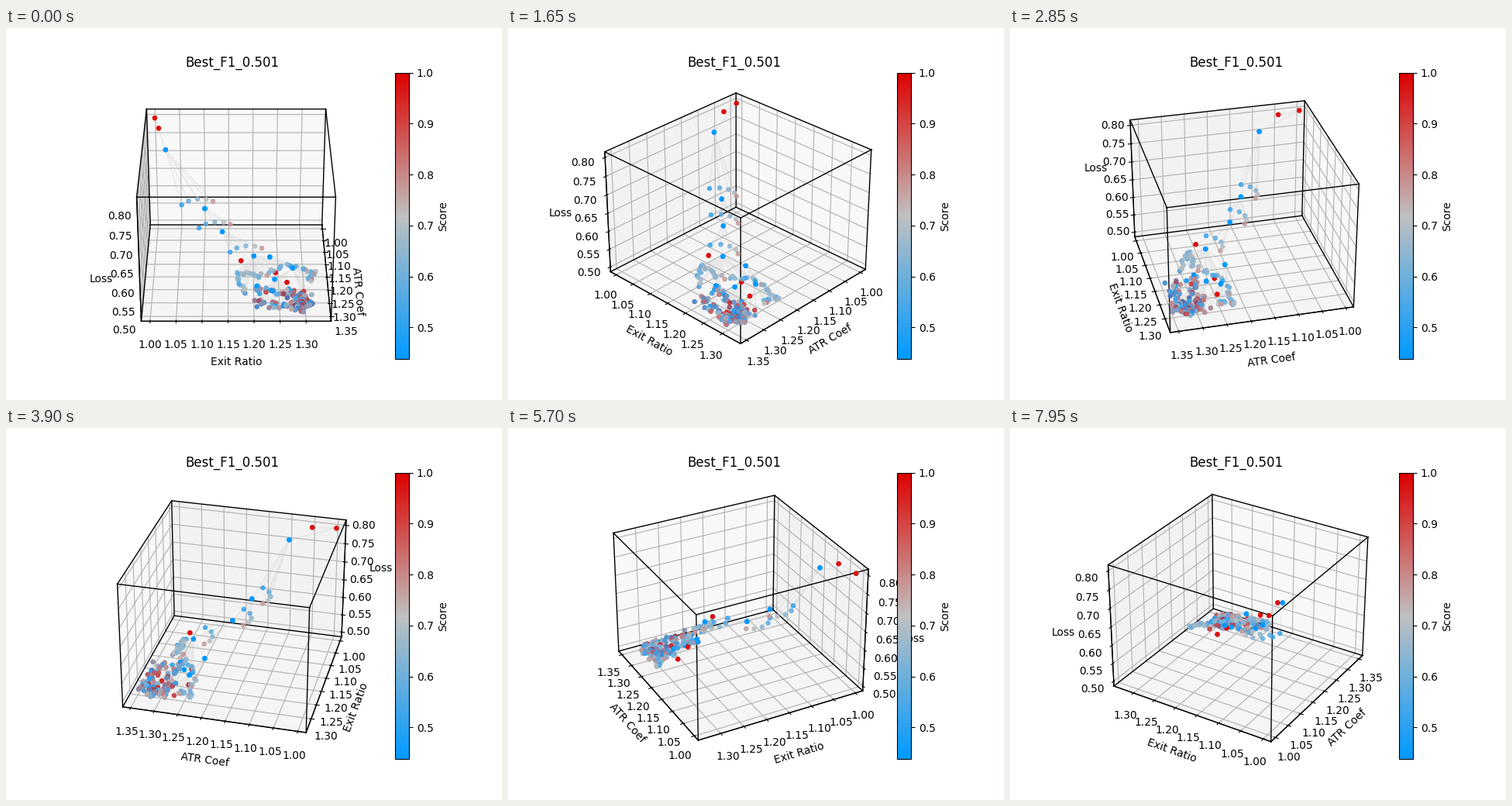
A matplotlib script that plays this animation: 640 px wide and 480 px high, repeating every 8 s.

```python
from itertools import combinations, product

import matplotlib.pyplot as plt
import numpy as np
from matplotlib.animation import FuncAnimation
from matplotlib.cm import ScalarMappable
from matplotlib.colors import LinearSegmentedColormap, Normalize

FRAMES, INTERVAL = 80, 100
VIEW_MS, DEGREES_PER_VIEW = 150, 4
LIMITS = (0.983, 1.367), (0.983, 1.348), (0.4862, 0.8147)
LOW_SCORE, HIGH_SCORE = 0.438, 1.0

# Key points are (ATR coefficient, exit ratio, loss).
BEST = np.array([
    (1.000, 1.000, 0.800), (1.096, 1.025, 0.770), (1.157, 1.103, 0.648),
    (1.190, 1.138, 0.606), (1.258, 1.200, 0.586), (1.225, 1.232, 0.560),
    (1.245, 1.277, 0.543), (1.267, 1.241, 0.528), (1.285, 1.206, 0.522),
])
WORST = np.array([
    (1.000, 1.000, 0.800), (1.050, 1.010, 0.801), (1.273, 1.175, 0.5835),
    (1.250, 1.243, 0.534), (1.250, 1.266, 0.507), (1.317, 1.293, 0.501),
])
OUTER = np.array([
    (1.310, 1.182, 0.521), (1.290, 1.168, 0.561), (1.288, 1.208, 0.551),
    (1.240, 1.265, 0.549), (1.232, 1.322, 0.521), (1.260, 1.310, 0.517),
])
rng = np.random.default_rng(7)


def trail(points, count, spread=(.004, .003, .002)):
    """Places spread along a line through the key points."""
    points = np.asarray(points)
    along = np.linspace(0, len(points) - 1, count)
    line = [np.interp(along, range(len(points)), axis) for axis in points.T]
    return np.transpose(line) + rng.normal(0, spread, (count, 3))


def children(center, count=5):
    """An arc of trial places around a best place."""
    angle = np.radians(np.linspace(150, 255, count))
    radius = np.linspace(.032, .048, count)
    return center + np.column_stack(
        [radius * np.cos(angle), radius * np.sin(angle), np.full(count, .002)])


def dense_places():
    rows = [trail([(1.290 + shift, 1.205, .515 - shift / 7),
                   (1.295 + shift, 1.280, .507 - shift / 7)], 26,
                  (.008, .004, .002)) for shift in (0, .04)]
    core = rng.normal((1.317, 1.293, .501), (.016, .011, .003), (65, 3))
    return np.clip(np.vstack([*rows, core]), (1, 1, .493), (1.35, 1.322, .8))


def build_dots():
    """Every place is visited several times, with a score for each visit."""
    early = np.vstack([children(center) for center in BEST[2:5]])
    early_scores = np.tile(np.linspace(.77, .52, 5), 3)
    outer, dense = trail(OUTER, 50), dense_places()
    places = [np.repeat(early, 2, axis=0), np.repeat(outer, 2, axis=0),
              np.repeat(dense, 4, axis=0),
              np.repeat(WORST, 4, axis=0), np.repeat(BEST[1:], 6, axis=0)]
    trials = rng.random(len(places[2])) ** 1.3
    scores = [np.repeat(early_scores, 2),
              rng.normal(.65, .08, len(places[1])),
              LOW_SCORE + (HIGH_SCORE - LOW_SCORE) * trials,
              np.full(len(places[3]), .98), np.full(len(places[4]), .44)]
    nodes = np.vstack([BEST[1:], WORST[1:], early, outer, dense])
    return np.vstack(places), np.concatenate(scores), nodes


def parent_of(node):
    """Nearest best place with a clearly higher loss."""
    distance = np.linalg.norm(BEST - node, axis=1)
    distance[BEST[:, 2] < node[2] + .015] = np.inf
    return BEST[np.argmin(distance)]


def draw_segments(ax, segments, **style):
    gap = np.full(3, np.nan)
    path = np.array([point for a, b in segments for point in (a, b, gap)])
    ax.plot(*path.T, **style)


def box_edges():
    return [(a, b) for a, b in combinations(product(*LIMITS), 2)
            if np.not_equal(a, b).sum() == 1]


fig = plt.figure(figsize=(6.4, 4.8), dpi=100)
ax = fig.add_subplot(projection="3d")
places, scores, nodes = build_dots()
draw_segments(ax, [(parent_of(node), node) for node in nodes],
              color="#c0c0c0", alpha=0.25, lw=1)
draw_segments(ax, box_edges(), color="black", lw=1)

score_map = LinearSegmentedColormap.from_list(
    "score", ["#0099ff", "#c0c0c0", "#dd0000"])
score_range = Normalize(LOW_SCORE, HIGH_SCORE)
ax.scatter(*places.T, c=scores, cmap=score_map, norm=score_range,
           s=14, linewidths=0.8, alpha=0.6)
fig.colorbar(ScalarMappable(score_range, score_map), ax=ax, label="Score")
ax.set(xlim=LIMITS[0], ylim=LIMITS[1], zlim=LIMITS[2], xlabel="ATR Coef",
       ylabel="Exit Ratio", zlabel="Loss", title="Best_F1_0.501")


def update(frame):
    # Each view is held for 150 ms, sampled at the middle of the frame.
    view = int((frame + 0.5) * INTERVAL // VIEW_MS)
    ax.view_init(elev=30, azim=DEGREES_PER_VIEW * view)
    return []


update(0)
anim = FuncAnimation(fig, update, frames=FRAMES, interval=INTERVAL,
                     repeat=True, repeat_delay=0)
plt.show()
```
